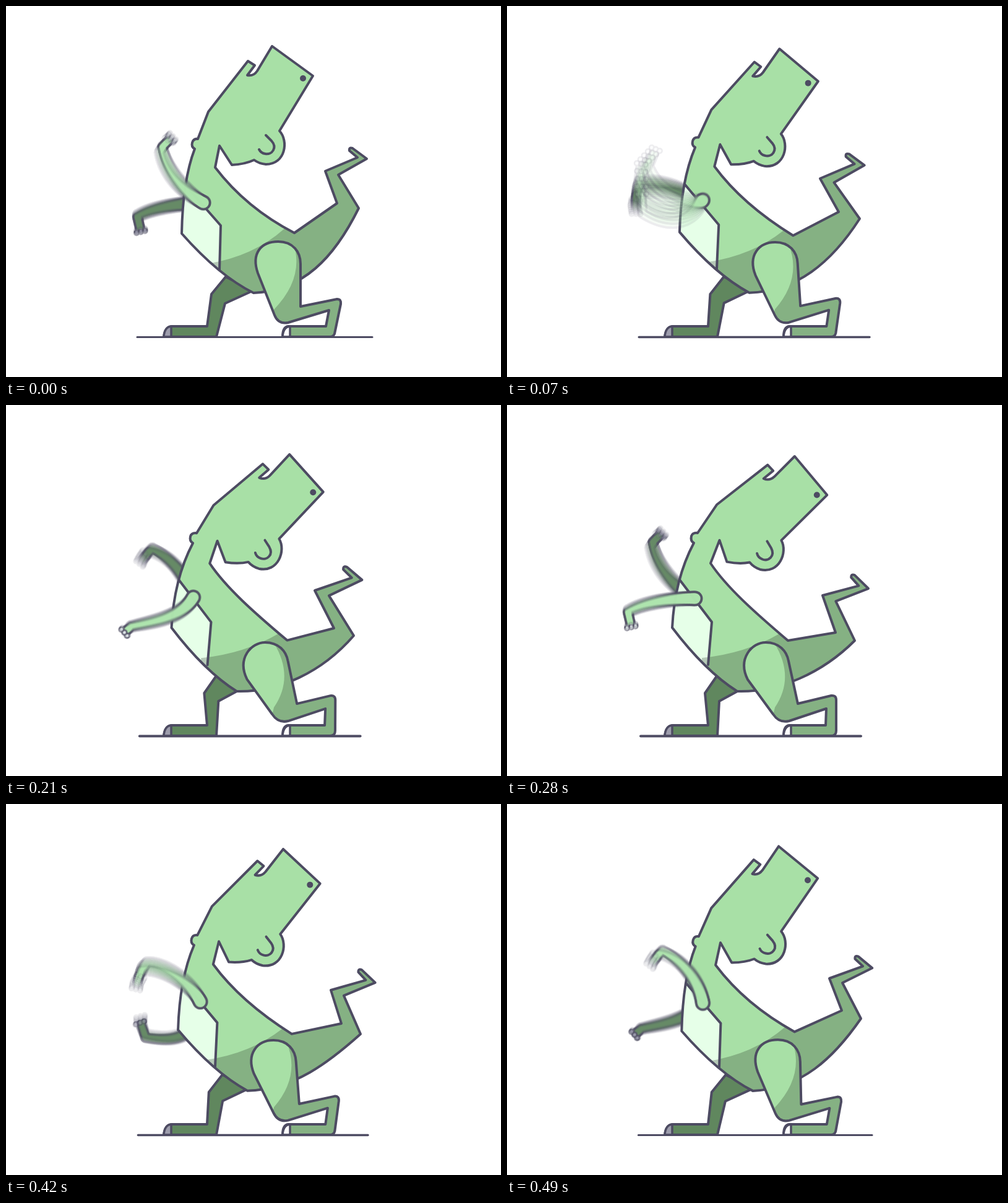
These frames come from a looping animation (800x600 px, 560 ms). An HTML page with a canvas:

```html
<!DOCTYPE html>
<html lang="en">
<head>
<meta charset="utf-8">
<title>Dancing dinosaur</title>
<style>
  html, body { margin: 0; width: 100%; height: 100%; overflow: hidden; background: #fff; }
  canvas { display: block; }
</style>
</head>
<body>
<canvas id="stage" width="800" height="600"></canvas>
<script>
const STEP = 70;
const INK = '#4d4b62', LIGHT = '#a8e0a6', DEEP = '#60875e', BELLY = '#e6ffe8';
const SHADE = 'rgba(0,0,0,.21)';

// sway, head tilt, head shift, inner tail knee, outer tail knee, tail elbow, tail end turn and scale
const POSES = [
  [0,    0,   0, 535,319, 570,327, 516,267,  0, 1],
  [.3,   4,   0, 536,333, 570,344, 506,279,  0, 1.07],
  [.8,   8,  -3, 532,351, 564,360, 493,291,  1, 1.14],
  [.97, 12,  -2, 530,361, 562,373, 499,300,  4, 1.12],
  [1,   14,   0, 531,368, 562,381, 510,308,  8, 1.07],
  [.7,  11,   0, 540,371, 569,389, 521,314, 10, 1.06],
  [.35,  7,   0, 542,355, 573,372, 525,301,  7, 1.04],
  [.1,  3.3, .5, 541,334, 572,347, 521,282,  3, 1.02]
];

// shoulder, two curve controls, wrist, hand
const ARMS = [
  [319,318, 285,300, 258,265, 253,226, 266,214],
  [322,316, 295,334, 240,337, 216,294, 221,262],
  [321,313, 318,370, 299,393, 232,381, 225,360],
  [319,317, 300,351, 251,356, 219,364, 211,371],
  [321,319, 277,318, 232,328, 212,341, 217,360],
  [322,320, 292,299, 247,284, 215,294, 212,320],
  [320,322, 306,292, 256,260, 226,264, 219,287],
  [318,323, 314,281, 282,246, 253,239, 240,251]
];
const SMEAR = [.16, .5, .1, .1, .1, .32, .3, .22];

// Each pair holds the upright and the leaning shape.
const BACK_LEG = [
  'M355,438 L332,466 L325,518 L268,518 Q257,519 255,535 L340,535 L354,481 L400,460 Z',
  'M340,437 L320,466 L325,518 L268,518 Q257,519 255,535 L340,535 L343,479 L376,461 Z'];
const FRONT_LEG = [
  'M476,486 L535,474 Q542,474 541,482 L531,530 Q529,535 524,535 L447,535 Q447,519 456,518 L517,518 L522,492 L456,512 Q440,515 434,500 L407,432 C396,400 412,381 440,381 C464,381 476,398 476,417 Z',
  'M470,483 L524,470 Q532,469 532,477 L532,527 Q532,535 524,535 L447,535 Q447,519 456,518 L515,518 L516,491 L456,511 Q440,515 430,500 L389,444 C372,410 396,384 418,384 C440,384 452,398 455,414 Z'];
const LEG_SHADE = [
  'M465,385 Q482,440 433,491 L420,545 L600,545 L600,385 Z',
  'M432,385 Q466,440 433,489 L420,545 L600,545 L600,385 Z'];
const FRONT = [
  'M400,464 Q344,436 284,368 C285,310 292,265 305,231 Q299,228 301,221 Q303,214 310,215',
  'M372,463 Q320,430 267,360 C270,300 285,255 302,223 Q296,220 298,212 Q300,206 308,207'];
const NECK = [
  'L338,261 C370,303 410,338 466,367',
  'L329,256 C355,295 400,335 454,381'];
const UNDERSIDE = [
  'C530,408 480,460 400,464 Z',
  'C510,433 440,465 372,463 Z'];
const PATCH = [
  'M290,290 L347,355 L345,428 L344,460 L200,460 L200,290 Z',
  'M277,280 L331,351 L325,421 L324,460 L200,460 L200,280 Z'];
const PATCH_EDGE = ['M290,290 L347,355 L345,427', 'M277,280 L331,351 L325,420'];
const BODY_SHADE = [
  'M325,417 Q400,405 450,360 L470,330 L500,215 L640,215 L640,600 L300,600 Z',
  'M315,409 Q385,402 440,370 L465,335 L500,215 L640,215 L640,600 L300,600 Z'];
const HEAD = 'L327,171 L391,89 L402,96 L390,112 Q400,114 406,105 L430,65 L496,113 L442,202 C457,218 452,256 420,256 Q409,255 401,249 Q386,256 365,257 L345,226';
const EAR = 'M420,209 L429,218 C439,229 430,241 419,239 Q412,238 409,232';
const TAIL_END = 'L52,-22 L39,-33 Q38,-39 44,-37 L67,-20 L21,6';

const ctx = document.getElementById('stage').getContext('2d');
const layer = () => Object.assign(document.createElement('canvas'), { width: 800, height: 600 }).getContext('2d');
const sample = layer(), blend = layer();
const mix = (a, b, t) => a + (b - a) * t;

function morph([from, to], t) {
  const ends = to.match(/-?[\d.]+/g);
  let i = 0;
  return from.replace(/-?[\d.]+/g, n => mix(+n, +ends[i++], t).toFixed(2));
}

// Turns and scales a path about a pivot, then moves the pivot to (x, y).
function turn(path, px, py, deg, x, y, scale = 1) {
  const c = Math.cos(deg * Math.PI / 180) * scale, s = Math.sin(deg * Math.PI / 180) * scale;
  return path.replace(/(-?[\d.]+),(-?[\d.]+)/g, (_, a, b) => {
    const u = a - px, v = b - py;
    return (x + u * c - v * s).toFixed(2) + ',' + (y + u * s + v * c).toFixed(2);
  });
}

function fill(path, color) {
  ctx.fillStyle = color;
  ctx.fill(new Path2D(path));
}

function line(path, width = 4) {
  ctx.lineWidth = width;
  ctx.strokeStyle = INK;
  ctx.stroke(new Path2D(path));
}

function inside(path, paint) {
  ctx.save();
  ctx.clip(new Path2D(path));
  paint();
  ctx.restore();
}

function dot(c, x, y, r, color) {
  c.fillStyle = color;
  c.beginPath();
  c.arc(x, y, r, 0, 7);
  c.fill();
}

function armAt(pos) {
  const i = Math.floor(pos), n = ARMS.length;
  const a = ARMS[(i + n) % n], b = ARMS[(i + 1 + n) % n];
  return a.map((v, k) => mix(v, b[k], pos - i));
}

function limb(c, arm, color, nail) {
  const [sx, sy, ax, ay, bx, by, wx, wy, hx, hy] = arm;
  const curve = (p, q, r, s, t) => {
    const u = 1 - t;
    return u * u * u * p + 3 * u * u * t * q + 3 * u * t * t * r + t * t * t * s;
  };
  const skin = (inset, paint) => {
    for (let t = 0; t <= 1.001; t += .02)
      dot(c, curve(sx, ax, bx, wx, t), curve(sy, ay, by, wy, t), mix(12.5, 8.5, t) - inset, paint);
    for (let t = 0; t <= 1; t += .1)
      dot(c, mix(wx, hx, t), mix(wy, hy, t), 8.5 - inset, paint);
  };
  const len = Math.hypot(hx - wx, hy - wy) || 1;
  const dx = (hx - wx) / len, dy = (hy - wy) / len;
  skin(0, INK);
  skin(3.8, color);
  for (const side of [-7, 0, 7]) {
    const x = hx + dx * 5 - dy * side, y = hy + dy * 5 + dx * side;
    dot(c, x, y, 5, INK);
    dot(c, x, y, 2.6, nail);
  }
}

// Averages several nearby arm positions into a motion smear.
function drawArm(index, sway, color, nail) {
  const count = 9;
  blend.clearRect(0, 0, 800, 600);
  blend.globalCompositeOperation = 'lighter';
  blend.globalAlpha = 1 / count;
  for (let k = 0; k < count; k++) {
    sample.clearRect(0, 0, 800, 600);
    limb(sample, armAt(index + SMEAR[index] * (k / (count - 1) * 2 - 1)), color, nail);
    blend.drawImage(sample.canvas, 0, 0);
  }
  ctx.drawImage(blend.canvas, -17 * sway, -6 * sway);
}

function toe(x, color) {
  const nail = `M${x},535 Q${x + 1},519 ${x + 12},518 L${x + 12},535 Z`;
  fill(nail, color);
  line(nail, 3.5);
}

function draw(index) {
  const [sway, tilt, shift, ix, iy, kx, ky, ex, ey, endTurn, endScale] = POSES[index];
  const at = pair => morph(pair, sway);
  const head = path => turn(path, 374, 216, tilt, 374 + shift, 216);

  ctx.fillStyle = '#fff';
  ctx.fillRect(0, 0, 800, 600);
  ctx.lineJoin = ctx.lineCap = 'round';

  line(`M${212 + 4 * sway},535.5 L${592 - 20 * sway},535.5`, 3 + sway);
  drawArm((index + 4) % POSES.length, sway, DEEP, '#9b9baa');

  const backLeg = at(BACK_LEG);
  fill(backLeg, DEEP);
  line(backLeg);
  toe(255, '#9d9dac');

  const body = at(FRONT) + head(HEAD) + at(NECK) + `L${ix},${iy} L${ex},${ey}` +
    turn(TAIL_END, 0, 0, endTurn, ex, ey, endScale) + `L${kx},${ky}` + at(UNDERSIDE);
  fill(body, LIGHT);
  inside(body, () => {
    fill(at(PATCH), BELLY);
    fill(at(BODY_SHADE), SHADE);
    line(at(PATCH_EDGE));
  });
  line(body);
  line(head(EAR));
  const [eyeX, eyeY] = head('480,117').split(',').map(Number);
  dot(ctx, eyeX, eyeY, 5, INK);

  const leg = at(FRONT_LEG);
  fill(leg, LIGHT);
  inside(leg, () => fill(at(LEG_SHADE), SHADE));
  line(leg);
  toe(447, '#fff');

  drawArm(index, sway, LIGHT, '#e4e6ea');
}

const start = performance.now();
let shown = -1;
function tick() {
  const index = Math.floor((performance.now() - start) / STEP) % POSES.length;
  if (index !== shown) draw(shown = index);
  requestAnimationFrame(tick);
}
tick();
</script>
</body>
</html>
```
